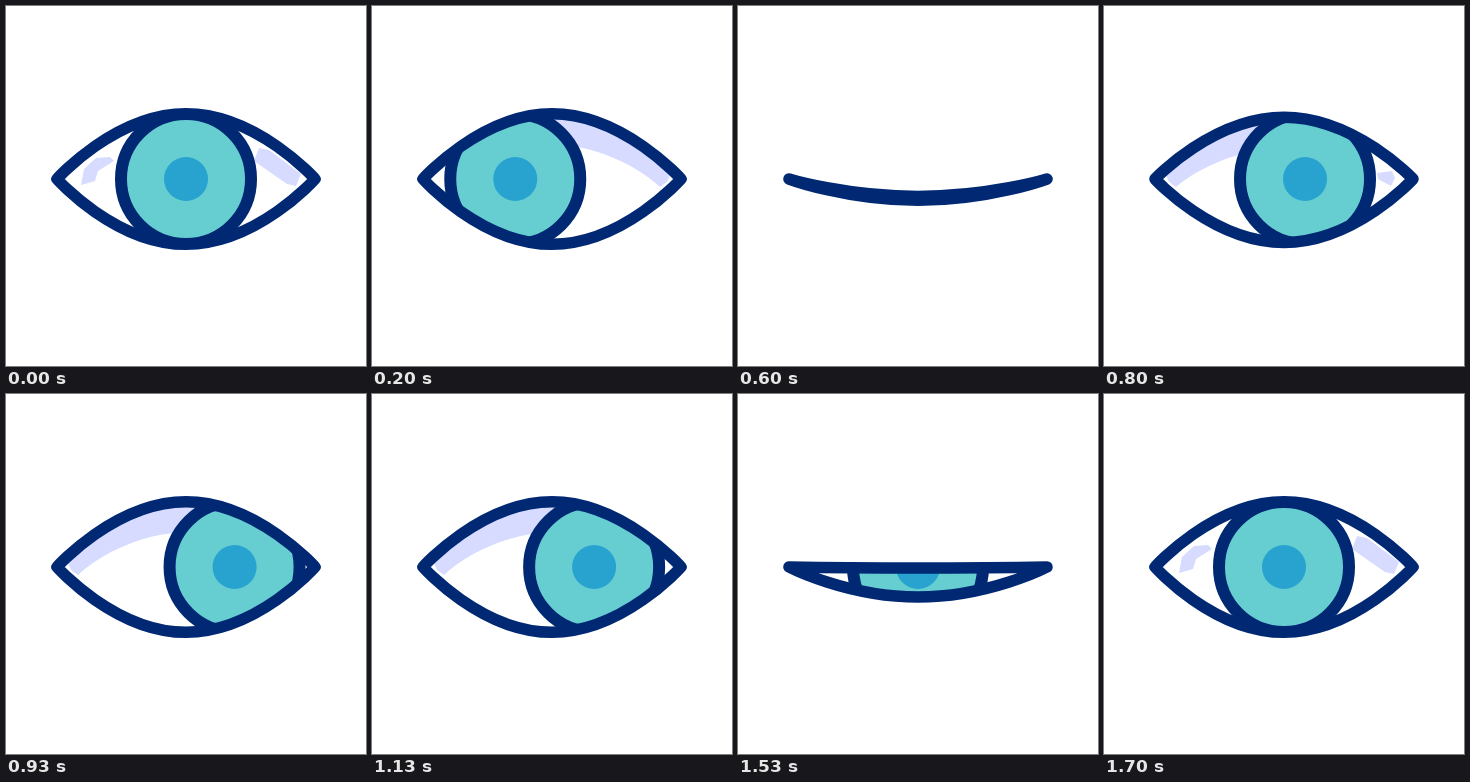
Write an HTML page that moves like this. It is 360 px wide and 360 px high and loops after 2 s.

```html
<!DOCTYPE html>
<html lang="en">
<head>
<meta charset="utf-8">
<title>Eye</title>
<style>
html, body { margin: 0; width: 100%; height: 100%; overflow: hidden; background: #fff; }
svg { display: block; width: 100vw; height: 100vh; }
.line { fill: none; stroke: #002873; stroke-width: 12; stroke-linejoin: round; stroke-linecap: round; }
#lids { stroke-width: 11.5; }
.shade { fill: #d6dbff; }
</style>
</head>
<body>
<svg viewBox="0 0 360 360">
  <defs>
    <clipPath id="eye"><path id="opening"/></clipPath>
    <clipPath id="side"><rect id="sideRect" y="0" width="360" height="360"/></clipPath>
  </defs>
  <g clip-path="url(#eye)">
    <g clip-path="url(#side)"><path id="band" class="shade"/></g>
    <g id="glints" class="shade">
      <path d="M75 179L78 163L90 152L104 151L108 155L92 165L89 175Z"/>
      <path d="M248 155L253 142L263 144L295 168L290 180L281 178Z"/>
    </g>
    <path id="faint" fill="#e2ebf3" d="M80 168L102 159L113 158L115 163L101 171L82 175Z"/>
    <path id="corner" class="shade" d="M273 167L288 165L291 172L287 180L274 173Z"/>
    <g id="iris">
      <circle cx="180" cy="173" r="65" fill="#66cdd1"/>
      <circle class="line" cx="180" cy="173" r="65"/>
      <circle cx="180" cy="173" r="22" fill="#28a2cf"/>
    </g>
  </g>
  <path id="lids" class="line"/>
</svg>
<script>
const LOOP = 2000, STEP = 1000 / 30;
const $ = id => document.getElementById(id);

// Keys are [tick, value] at 60 ticks per second.
const GAZE = [[0, 0], [24, -73.5], [59.5, 52], [90, 0]];
const BLINK = [[26.4, 0], [36, 0.97], [49.7, 0], [78.4, 0], [88, 0.97], [102, 0]];

function ease(keys, tick) {
  if (tick <= keys[0][0]) return keys[0][1];
  for (let i = 1; i < keys.length; i++) {
    const [t0, v0] = keys[i - 1], [t1, v1] = keys[i];
    if (tick <= t1) {
      const u = (tick - t0) / (t1 - t0);
      return v0 + (v1 - v0) * u * u * (3 - 2 * u);
    }
  }
  return keys[keys.length - 1][1];
}

const show = (id, on) => $(id).setAttribute("visibility", on ? "visible" : "hidden");

function draw(ms) {
  const tick = 2 * Math.floor((ms % LOOP + 4) / STEP);
  const gaze = ease(GAZE, tick), shut = ease(BLINK, tick);
  const top = 107.7 + 85.3 * shut, bottom = 238.3 - 45.3 * shut;
  const upper = `M51 173C51 173 109 ${top} 180 ${top}S309 173 309 173`;
  const eye = `${upper}C309 173 251 ${bottom} 180 ${bottom}S51 173 51 173Z`;
  $("lids").setAttribute("d", eye);
  $("opening").setAttribute("d", eye);

  const drop = 85 * shut, low = 138.5 + drop, mid = 159.5 + drop / 2;
  $("band").setAttribute("d",
    `${upper}L300 165L295 176L288 181C265 ${mid} 222 ${low} 180 ${low}S95 ${mid} 72 181L65 176L60 165Z`);
  $("iris").setAttribute("transform", `translate(${gaze} 0)`);
  $("sideRect").setAttribute("x", gaze < 0 ? 180 + gaze : gaze - 180);

  const centred = Math.abs(gaze) < 11;
  show("band", !centred);
  show("glints", centred && shut < 0.15);
  show("faint", centred && shut >= 0.15 && shut < 0.5);
  show("corner", gaze >= 11 && gaze < 32 && shut < 0.3);
}

const start = performance.now();
function loop() {
  draw(performance.now() - start);
  requestAnimationFrame(loop);
}
loop();
</script>
</body>
</html>
```
